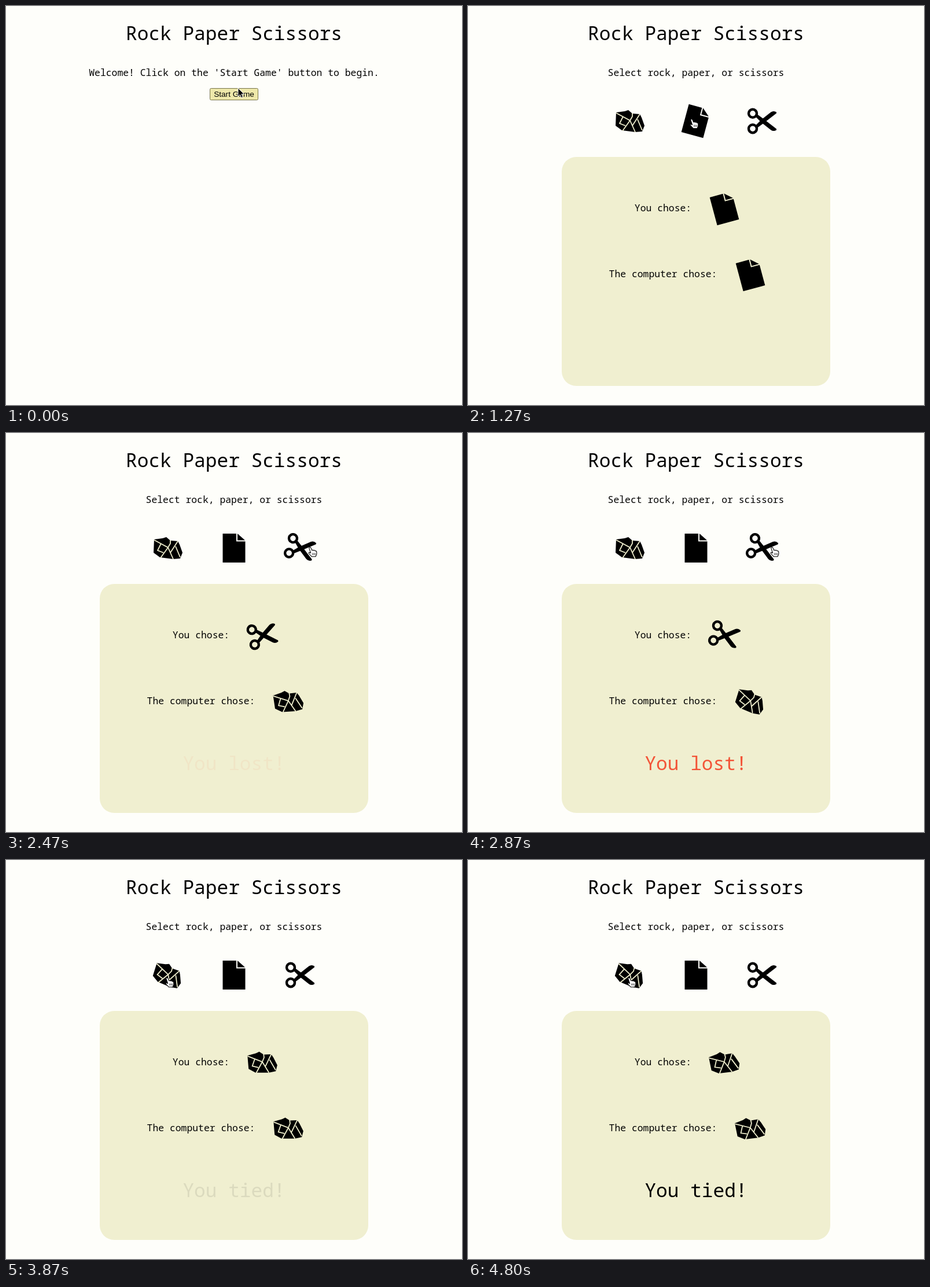
An HTML page that plays this animation: 788x690 px, repeating every 4830 ms.

```html
<!DOCTYPE html>
<html lang="en">
<head>
<meta charset="utf-8">
<title>Rock Paper Scissors</title>
<style>
  html, body { margin: 0; width: 100%; height: 100%; overflow: hidden; background: #fefefa; }
  svg { display: block; width: 788px; height: 690px; }
  text { font: 500 16.4px "Noto Sans Mono", "DejaVu Sans Mono", monospace; text-anchor: middle; white-space: pre; }
  .big { font-size: 32.8px; }
  .label { font: 13.65px "Liberation Sans", Arial, sans-serif; }
  .gap { fill: none; stroke: #eeedcc; stroke-width: 1.8; }
</style>
</head>
<body>
<svg viewBox="0 0 788 690">
  <defs>
    <g id="rock">
      <path d="M-24-15L-9-17-3-19 4-13 17-12 20-6 25 8 21 18 9 19-14 16-25 8Z"/>
      <path class="gap" d="M-24-14L0-1 4-8 4-14M-12-8L-18 4-8 8M0-1L-13 17M0-1L9 19M17-12L4 8M13-3L21 16"/>
    </g>
    <g id="paper">
      <path d="M-19.500-25H4V-11.500H19.500V25H-19.500ZM6-25L19-13.500H6Z"/>
    </g>
    <g id="scissors">
      <g fill="none" stroke="#000" stroke-width="4.400">
        <circle cx="-16" cy="-13.2" r="7"/>
        <circle cx="-16" cy="13.2" r="7"/>
      </g>
      <path id="blade" d="M-11.500-8L-8.500-12 3-3.500 25 13.500V15.500Q20 18.500 15.500 15.500L-1 2.500Z"/>
      <use href="#blade" transform="scale(1 -1)"/>
    </g>
  </defs>

  <text class="big" x="394" y="59">Rock Paper Scissors</text>
  <text id="prompt" x="394" y="121"></text>

  <g id="start">
    <rect x="352.500" y="142.500" width="83" height="20" rx="2" fill="#eee8aa" stroke="#77744a"/>
    <text class="label" x="394" y="157">Start Game</text>
  </g>

  <g id="menu">
    <use href="#rock"/>
    <use href="#paper"/>
    <use href="#scissors"/>
  </g>

  <g id="panel">
    <rect x="162" y="261" width="464" height="396" rx="25" fill="#f0efd0"/>
    <text x="337" y="355">You chose:</text>
    <text x="337" y="469">The computer chose:</text>
    <use id="yours"/>
    <use id="theirs"/>
    <text id="verdict" class="big" x="394" y="583"></text>
  </g>

  <g id="cursor" stroke-linejoin="round">
    <path id="arrow" d="M0 0V14.500L3.400 11.400 5.700 16.700 8.300 15.600 6 10.400H10.600Z" stroke="#fff"/>
    <g id="hand" fill="#fff" stroke="#000" stroke-width="1.100">
      <path d="M-2.300 .8Q-.7-1.600 .9 .6L2.800 5Q4.400 3.500 5.400 5.300 7.300 4 8.200 6 10.600 5.500 10.800 8V11.500L9 15.700H2.200L-2.600 10.500Q-3.400 8.500-1.600 8.600L.6 9.600Z"/>
      <path d="M3.800 9.500V13M6 9.500V13M8.200 9.500V13" stroke-width=".8"/>
    </g>
  </g>
</svg>

<script>
const LOOP = 4830, START_AT = 270;
const $ = id => document.getElementById(id);
const show = (el, on) => { el.style.display = on ? "" : "none"; };

const choices = [...$("menu").children];
const centers = [280, 394, 508], rowY = 199, reach = 51, lean = 15;

const rounds = [
  { at: 1270, you: "paper", cpu: "paper", text: "You tied!", color: "#000" },
  { at: 2410, you: "scissors", cpu: "rock", text: "You lost!", color: "#f52408" },
  { at: 3780, you: "rock", cpu: "rock", text: "You tied!", color: "#000" }
];

// Pointer moves: start, end, target x, y
const moves = [
  [330, 540, 406, 156],
  [900, 1150, 387, 196],
  [1800, 2230, 526, 198],
  [3240, 3650, 279, 204]
];

const clamp = v => Math.min(1, Math.max(0, v));
const smooth = v => v * v * (3 - 2 * v);

function pointer(t) {
  let x = 401, y = 142;
  for (const [from, to, tx, ty] of moves) {
    const k = smooth(clamp((t - from) / (to - from)));
    x += (tx - x) * k;
    y += (ty - y) * k;
  }
  return [x, y];
}

// Standard "ease" curve: cubic-bezier(.25, .1, .25, 1)
function ease(v) {
  const bez = (a, b, s) => 3 * a * s * (1 - s) ** 2 + 3 * b * s * s * (1 - s) + s ** 3;
  let lo = 0, hi = 1;
  for (let i = 0; i < 20; i++) {
    const mid = (lo + hi) / 2;
    if (bez(.25, .25, mid) < v) lo = mid; else hi = mid;
  }
  return bez(.1, 1, lo);
}

// Swings left to right and back, half a second each way
function wobble(age) {
  const half = age / 500;
  const swing = lean * (2 * ease(half % 1) - 1);
  return Math.floor(half) % 2 ? -swing : swing;
}

function place(el, x, y, angle = 0) {
  el.setAttribute("transform", `translate(${x} ${y}) rotate(${angle})`);
}

function drawRound(t) {
  const round = rounds.filter(r => t >= r.at).pop();
  show($("panel"), round);
  if (!round) return;
  const age = t - round.at;
  const tilt = wobble(age);
  $("yours").setAttribute("href", "#" + round.you);
  $("theirs").setAttribute("href", "#" + round.cpu);
  place($("yours"), 443, 350, tilt);
  place($("theirs"), 488, 464, tilt);
  const verdict = $("verdict");
  verdict.textContent = round.text;
  verdict.setAttribute("fill", round.color);
  verdict.setAttribute("opacity", ease(clamp(age / 1000)));
}

function draw(t) {
  const playing = t >= START_AT;
  const [x, y] = pointer(t);
  let over = false;

  $("prompt").textContent = playing
    ? "Select rock, paper, or scissors"
    : "Welcome! Click on the 'Start Game' button to begin.";
  show($("start"), !playing);
  show($("menu"), playing);

  choices.forEach((el, i) => {
    const hit = playing && Math.abs(x - centers[i]) < reach && Math.abs(y - rowY) < reach;
    over = over || hit;
    place(el, centers[i], rowY, hit ? lean : 0);
  });

  drawRound(t);
  show($("arrow"), !over);
  show($("hand"), over);
  place($("cursor"), x, y);
}

const begin = performance.now();
function tick() {
  draw((performance.now() - begin) % LOOP);
  requestAnimationFrame(tick);
}
tick();
</script>
</body>
</html>
```
